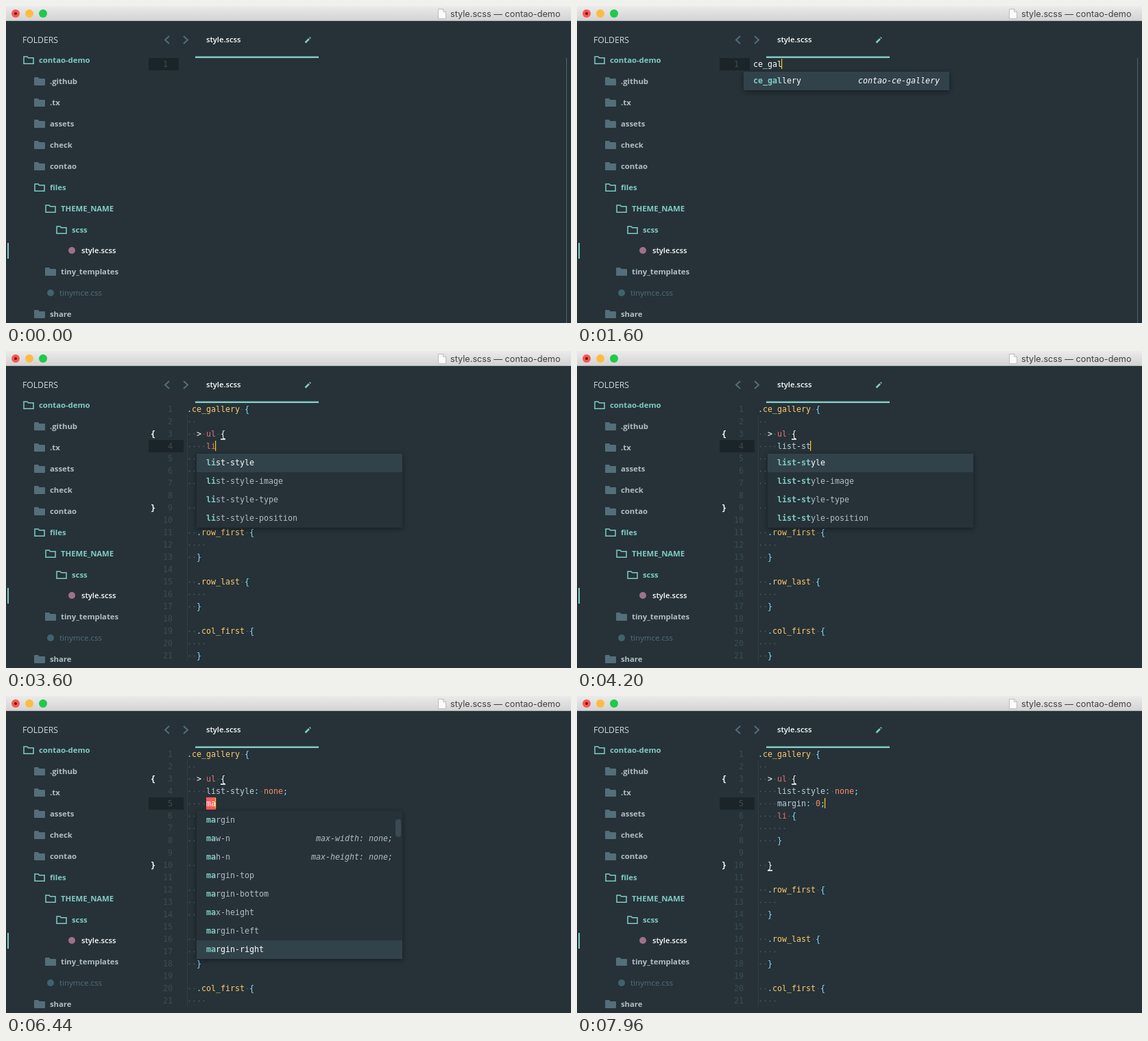
Write an HTML page with a canvas that moves like this. It is 824 px wide and 463 px high and loops after 8000 ms.

```html
<!DOCTYPE html>
<html lang="en">
<head>
<meta charset="utf-8">
<title>Editor typing</title>
<style>
  html, body { margin: 0; width: 100%; height: 100%; overflow: hidden; background: #263238; }
  canvas { display: block; }
</style>
</head>
<body>
<canvas id="stage" width="824" height="463"></canvas>
<script>
const ctx = document.getElementById('stage').getContext('2d');
const LOOP = 8000, CHAR = 7, LINE = 18, ROW = 27;
const MONO = '11.63px "DejaVu Sans Mono", monospace';
const SANS = '"Open Sans", "Noto Sans", sans-serif';
const TEAL = '#80cbc4', SLATE = '#546e7a', PALE = '#b0bec5', WHITE = '#ffffff',
      CYAN = '#89ddff', YELLOW = '#ffcb6b', RED = '#e57373', ORANGE = '#f78c6c', BG = '#263238';

const block = name => [`  .${name} {`, '    ', '  }', ''];
const snippet = ['.ce_gallery {', '  ', '  > ul {', '    ', '    li {', '      ', '    }', '', '  }', '',
  ...['row_first', 'row_last', 'col_first', 'col_last'].flatMap(block), '}'];

const elements = ['text', 'code', 'list', 'form', 'form', 'code', 'text', 'list', 'table', 'gallery'];
const menus = {
  element: { thumb: [4, 39], items: elements.map(e => ['ce_' + e, 'contao-ce-' + e]) },
  list: { items: [['list-style'], ['list-style-image'], ['list-style-type'], ['list-style-position']] },
  value: { items: [['none']] },
  margin: { thumb: [12, 26], items: [['margin'], ['maw-n', 'max-width: none;'], ['mah-n', 'max-height: none;'],
    ['margin-top'], ['margin-bottom'], ['max-height'], ['margin-left'], ['margin-right'], ['max-width']] }
};

// Each step: time, caret row, text of that row, open menu, selected menu row.
const steps = [];
const step = (at, row, text, menu, selected = 0) => steps.push({ at, row, text, menu, selected });
const type = (at, gap, row, before, word, menu, selected) =>
  [...word].forEach((_, i) => step(at + i * gap, row, before + word.slice(0, i + 1), menu, selected));

step(-600, 0, '');
type(360, 140, 0, '', 'ce_', 'element');
type(960, 160, 0, 'ce_', 'gal', 'element');
step(1840, 1, '  ');
step(2960, 3, '    ');
type(3480, 112, 3, '    ', 'list-st', 'list');
step(4480, 3, '    list-style');
step(4800, 3, '    list-style:');
step(4960, 3, '    list-style: ');
type(5240, 160, 3, '    list-style: ', 'non', 'value');
step(5760, 3, '    list-style: none');
step(5900, 3, '    list-style: none;');
step(6020, 4, '    ');
type(6160, 120, 4, '    ', 'ma', 'margin', 7);
type(6680, 110, 4, '    ma', 'rgin', 'margin');
step(7200, 4, '    margin: ');
step(7660, 4, '    margin: 0');
step(7820, 4, '    margin: 0;');

function documentAt({ row, text, at }) {
  if (at < 1840) return [text];
  const lines = [...snippet];
  if (row === 4) {
    lines[3] = '    list-style: none;';
    lines.splice(4, 0, text);
  } else lines[row] = text;
  return lines;
}

function rect(x, y, w, h, color) {
  ctx.fillStyle = color;
  ctx.fillRect(x, y, w, h);
}
function text(str, x, y, color, font = MONO, align = 'left') {
  ctx.font = font;
  ctx.fillStyle = color;
  ctx.textAlign = align;
  ctx.fillText(str, x, y);
}
function disc(x, y, r, color) {
  ctx.fillStyle = color;
  ctx.beginPath();
  ctx.arc(x, y, r, 0, 7);
  ctx.fill();
}
function stroke(path, color, width) {
  ctx.strokeStyle = color;
  ctx.lineWidth = width;
  ctx.stroke(new Path2D(path));
}

function folder(x, y, open) {
  if (open) {
    stroke(`M${x + 1} ${y - 5}h5l1.5 1.7h7.5v8.6h-14z`, TEAL, 1.5);
    return;
  }
  ctx.fillStyle = SLATE;
  ctx.fill(new Path2D(`M${x} ${y - 5}q0-1 1-1h5l1.5 2h7.5q1 0 1 1v8q0 1-1 1h-14q-1 0-1-1z`));
}

function drawTitle() {
  const bar = ctx.createLinearGradient(0, 0, 0, 22);
  bar.addColorStop(0, '#ebebeb');
  bar.addColorStop(1, '#d2d2d2');
  rect(0, 0, 824, 22, bar);
  rect(0, 21, 824, 1, '#b4b4b4');
  ['#fc5650', '#fdbc40', '#1fc94b'].forEach((c, i) => disc(14 + 20 * i, 11, 6, c));
  disc(14, 11, 2, '#5f0a08');
  ctx.fillStyle = '#fbfbfb';
  const sheet = 'M630.5 4.5h7l4 4v10h-11z';
  ctx.fill(new Path2D(sheet));
  stroke(sheet + 'm7 0v4h4', '#bcbcbc', 1);
  text('style.scss — contao-demo', 648, 16, '#404040', '12.7px Inter, sans-serif');
}

// Tree entries: name, depth, kind.
const tree = [['contao-demo', 0, 'open'], ['.github', 1], ['.tx', 1], ['assets', 1], ['check', 1], ['contao', 1],
  ['files', 1, 'open'], ['THEME_NAME', 2, 'open'], ['scss', 3, 'open'], ['style.scss', 4, 'active'],
  ['tiny_templates', 2], ['tinymce.css', 2, 'dim'], ['share', 1]];

function drawSidebar() {
  text('FOLDERS', 24, 54, '#cfd8dc', '12.2px ' + SANS);
  tree.forEach(([name, depth, kind], i) => {
    const x = 25 + depth * 16, y = 79 + i * 31 - (i > 8 ? 1 : 0);
    if (kind === 'active') {
      disc(96, y, 5, '#a0708a');
      text(name, 110, y + 4, WHITE, '600 11.2px ' + SANS);
      rect(2, y - 11, 2, 23, TEAL);
    } else if (kind === 'dim') {
      disc(65, y, 5, '#41636d');
      text(name, 78, y + 4, SLATE, '11.5px ' + SANS);
    } else {
      folder(x, y, kind === 'open');
      text(name, x + 23, y + 4, kind ? TEAL : PALE, '700 11.3px ' + SANS);
    }
  });
}

function drawTab() {
  stroke('M238 44l-6 5.5l6 5.5M259 44l6 5.5l-6 5.5', SLATE, 2);
  text('style.scss', 292, 53, WHITE, '600 11.2px ' + SANS);
  stroke('M436.5 53.5l5.5-5.5M443 47l1-1', TEAL, 2.6);
  rect(276, 73.5, 180, 2.5, TEAL);
}

const indentOf = line => line.search(/\S|$/);
const broken = line => /[a-z]/.test(line) && !/[;{}]$/.test(line);

function enclosing(lines, { row, text }) {
  if (lines.length < 2) return [];
  let open = row - 1;
  while (!(lines[open].endsWith('{') && indentOf(lines[open]) < indentOf(text))) open--;
  const close = lines.findIndex((l, i) =>
    i > open && l.trim() === '}' && indentOf(l) === indentOf(lines[open]));
  return [open, close];
}

function tokenColor(token, previous) {
  if (previous === '.') return YELLOW;
  if (/^[.{}:;]$/.test(token)) return CYAN;
  if (/^(ul|li)$/.test(token)) return RED;
  if (/^(none|0)$/.test(token)) return ORANGE;
  if (token === '>' || token.startsWith('ce_')) return WHITE;
  return '#bcd0d8';
}

function drawLine(line, x, cy, plain, matched) {
  let previous = '';
  for (const { 0: token, index } of line.matchAll(/ |\.|[\w-]+|\S/g)) {
    const tx = x + index * CHAR;
    if (token === ' ') {
      rect(tx + 2.8, cy - 0.2, 1.4, 1.4, '#52656e');
      continue;
    }
    const brace = /[{}]/.test(token) && matched;
    text(token, tx, cy + 4, plain || brace ? WHITE : tokenColor(token, previous));
    if (brace) rect(tx, cy + 7, CHAR, 1.6, WHITE);
    previous = token;
  }
}

function drawEditor(state, t) {
  const lines = documentAt(state), single = lines.length < 2;
  const left = single ? 257 : 264, matches = enclosing(lines, state);
  const caretX = left + state.text.length * CHAR, caretY = 85 + state.row * LINE;
  rect(208, caretY - 9, single ? 44 : 51, LINE, '#1b2529');
  if (single) rect(817, 76, 1, 387, '#4b6b70');
  else rect(264, 94, 1, 360, '#2f3e44');

  lines.slice(0, 21).forEach((line, i) => {
    const cy = 85 + i * LINE, matched = matches.includes(i);
    text(i + 1, left - 21, cy + 4, '#3b4c54', MONO, 'right');
    if (matched) text(line.trim().slice(-1), 211, cy + 4, WHITE, 'bold ' + MONO);
    if (i === state.row && /^ +ma[rgin]*$/.test(line)) {
      const start = left + indentOf(line) * CHAR;
      rect(start, cy - 9, caretX - start, LINE, '#ff5a5f');
      drawLine(line, left, cy, true);
    } else drawLine(line, left, cy, i > 0 && broken(lines[i - 1]), matched);
  });
  if ((t - state.at) % 1000 < 500) rect(caretX - 1, caretY - 8, 1.2, 15, '#ffcc00');
  if (state.menu) drawMenu(state, left, caretY + 11);
}

function drawMenu({ text: typed, menu, selected }, left, y) {
  const word = typed.split(' ').pop();
  const { items, thumb } = menus[menu];
  const found = items.filter(([name]) => name.startsWith(word));
  const rows = found.slice(0, 8);
  const x = left + (typed.length - word.length - 2) * CHAR;
  ctx.save();
  ctx.shadowColor = 'rgba(0,0,0,.45)';
  ctx.shadowBlur = 8;
  ctx.shadowOffsetY = 2;
  rect(x, y, 300, rows.length * ROW, BG);
  ctx.restore();
  rows.forEach(([name, hint], i) => {
    const base = y + i * ROW + 17, color = i === selected ? WHITE : PALE;
    if (i === selected) rect(x, y + i * ROW, 300, ROW, '#32424a');
    text(word, x + 14, base, TEAL, 'bold ' + MONO);
    text(name.slice(word.length), x + 14 + word.length * CHAR, base, color);
    if (hint) text(hint, x + 286, base, color, 'italic ' + MONO, 'right');
  });
  if (found.length > 8) {
    ctx.fillStyle = '#3a4b52';
    ctx.beginPath();
    ctx.roundRect(x + 290, y + thumb[0], 8, thumb[1], 4);
    ctx.fill();
  }
}

function frame() {
  const t = performance.now() % LOOP;
  rect(0, 0, 824, 463, BG);
  drawSidebar();
  drawTab();
  drawEditor(steps.findLast(s => s.at <= t), t);
  drawTitle();
  requestAnimationFrame(frame);
}
frame();
</script>
</body>
</html>
```
